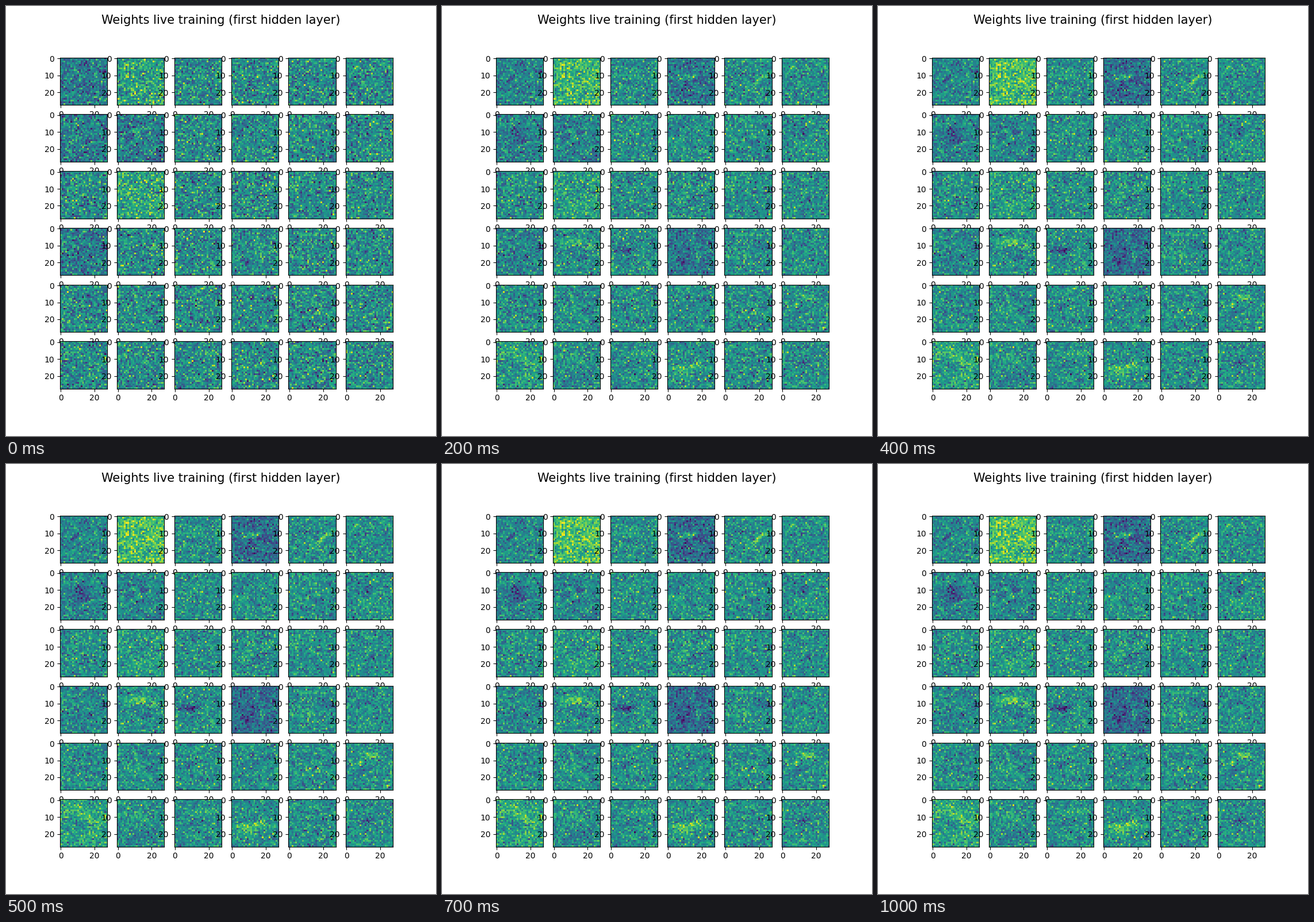
A matplotlib script for the animation above (1100 ms loop, 748 by 748 pixels).

```python
import numpy as np
import matplotlib.pyplot as plt
from matplotlib.animation import FuncAnimation

ROWS = COLS = 6
TILES = ROWS * COLS
SIDE = 28
FRAMES = 11
INTERVAL = 100

# Tiles whose mean level stands out before training, or moves during it
BIAS = {0: -.07, 1: .09, 6: -.06, 7: -.06, 13: .11, 18: -.07}
DRIFT = {1: .18, 3: -.15, 21: -.15, 30: .09}

# The clearest strokes: tile, gain, centre x, y, length, width, tilt
STROKES = [
    (3, .35, 11, 11, 3.5, 1, -15),
    (4, .3, 19, 14, 5, .8, -45),
    (6, -.25, 11, 14, 4.2, 3.8, 0),
    (7, -.3, 14, 9, 2, 1.8, 0),
    (19, .3, 13, 8, 4.5, 1.6, 0),
    (20, -.35, 8, 13, 3.5, 1.2, 0),
    (29, .35, 15, 7, 3, 1.1, 0),
    (33, .2, 13, 15, 7, 2.6, 0),
]

rng = np.random.default_rng(7)
yy, xx = np.mgrid[:SIDE, :SIDE]


def stroke(cx, cy, length, width, tilt):
    a = np.radians(tilt)
    u = (xx - cx) * np.cos(a) + (yy - cy) * np.sin(a)
    v = (yy - cy) * np.cos(a) - (xx - cx) * np.sin(a)
    return np.exp(-.5 * ((u / length) ** 2 + (v / width) ** 2))


def per_tile(values):
    levels = np.zeros((TILES, 1, 1))
    for tile, value in values.items():
        levels[tile] = value
    return levels


shape = (TILES, SIDE, SIDE)
noise = rng.normal(size=shape)
noise -= noise.mean(axis=(1, 2), keepdims=True)

# Outer pixels hardly learn, so changes fade towards the border
window = np.exp(-((xx - 13.5) ** 2 + (yy - 13.5) ** 2) / 130)
learned = .06 * rng.normal(size=shape) * window
for tile in range(TILES):
    for gain in (.13, -.13):
        cx, cy = rng.normal(13.5, 3.5, 2)
        learned[tile] += gain * stroke(cx, cy, rng.uniform(2, 5),
                                       rng.uniform(1, 2), rng.uniform(-40, 40))
for tile, gain, *place in STROKES:
    learned[tile] += gain * stroke(*place)

bias, drift = per_tile(BIAS), per_tile(DRIFT)


def weights(i):
    k = 1 - np.exp(-i / 2.1)
    level = .485 + .015 * k + bias * (1 - .6 * k) + drift * k
    spread = .16 - .03 * k
    return level + spread * noise + k * learned


fig, axes = plt.subplots(ROWS, COLS, figsize=(7.48, 7.48), dpi=100)
fig.suptitle("Weights live training (first hidden layer)", fontsize=15)
images = []
for ax, tile in zip(axes.flat, weights(0)):
    images.append(ax.imshow(tile, vmin=0, vmax=1, interpolation="nearest"))
    ax.set_xticks([0, 20])
    ax.set_yticks([0, 10, 20])


def update(i):
    for image, tile in zip(images, weights(i)):
        image.set_data(tile)
    return images


anim = FuncAnimation(fig, update, frames=FRAMES, interval=INTERVAL,
                     repeat=True, repeat_delay=0)
plt.show()
```
